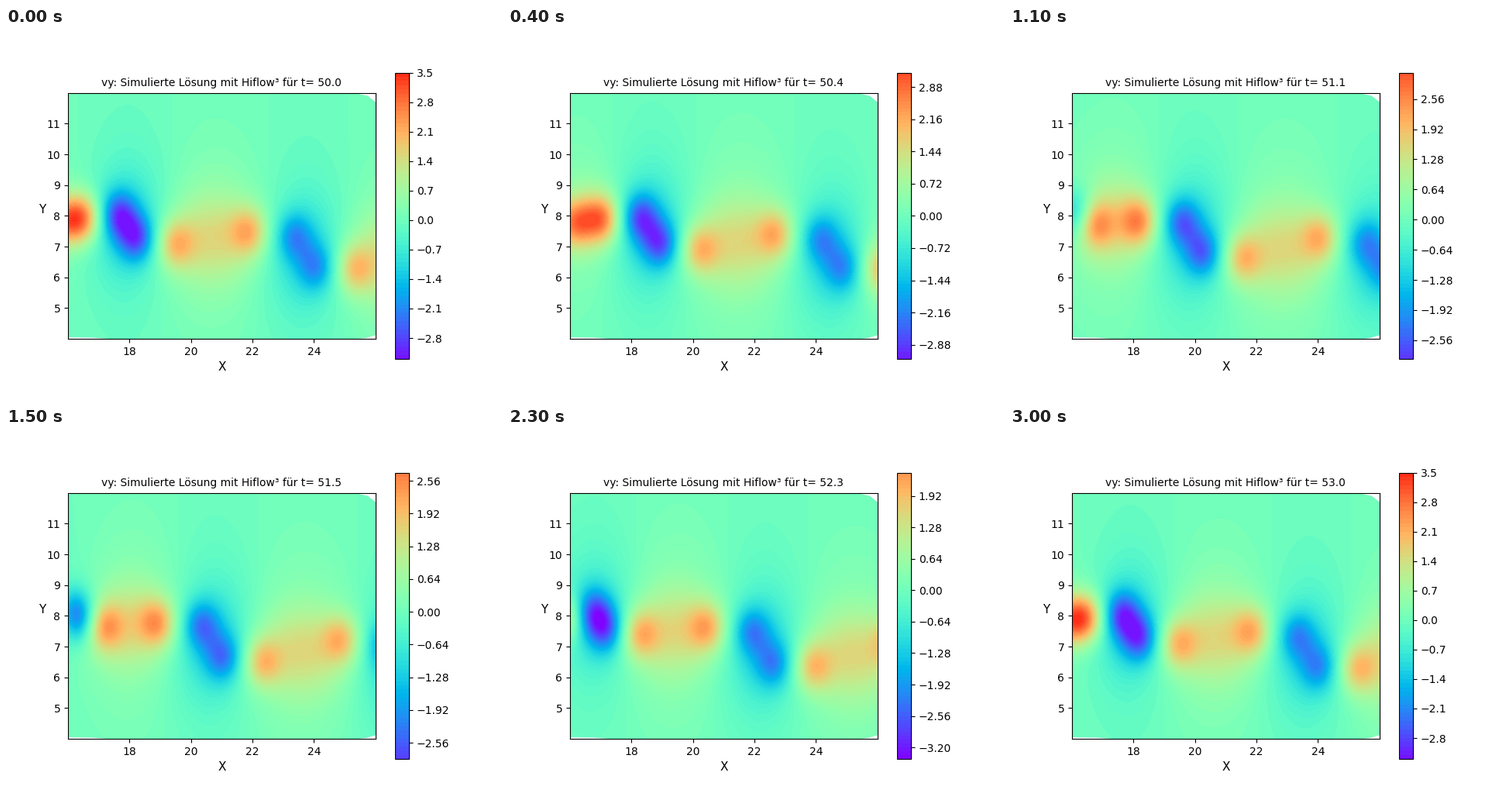
Animation of 640 by 480 pixels, one loop 3100 ms. Source, as a matplotlib script:

```python
import numpy as np
import matplotlib.pyplot as plt
from matplotlib.animation import FuncAnimation

FRAMES = 31
PERIOD = 3.02  # shedding period of the vortex street
SPEED = 2.0    # drift of the fully developed vortices
VMIN, VMAX = -3.45, 3.9

CORNERS = [
    [(25.3, 12), (25.75, 11.9), (26, 11.7), (26, 12)],
    [(25.45, 4), (25.7, 4.03), (26, 4.12), (26, 4)],
    [(16, 4.05), (16.8, 4.04), (17.3, 4), (16, 4)],
    [(16, 11.94), (16.2, 12), (16, 12)],
]

X, Y = np.meshgrid(np.linspace(16, 26, 251), np.linspace(4, 12, 201))


def rise(t, middle, width):
    return 1 / (1 + np.exp((middle - t) / width))


def core_path(x0, leave, ease, y0, y1, turn, turn_width):
    """A core that rests at x0, speeds up, and sinks from y0 to y1."""
    def at(t):
        x = x0 + SPEED * ease * np.log1p(np.exp((t - leave) / ease))
        return x, y0 + (y1 - y0) * rise(t, turn, turn_width)
    return at


def bump(x, y, w, h):
    return np.exp(-0.5 * (((X - x) / w) ** 2 + ((Y - y) / h) ** 2))


def vortex(trail, lead, birth, strength, boost, peak, peak_width,
           halo, halo_w, halo_h, tail, tail_w):
    """Two cores, then a halo and a wide tail that grow in a little later."""
    def at(t):
        (x1, y1), (x2, y2) = trail(t), lead(t)
        mx, my, sep = (x1 + x2) / 2, (y1 + y2) / 2, abs(x2 - x1)
        power = strength + boost / (1 + ((t - peak) / peak_width) ** 2)
        cores = bump(x1, y1, 0.42, 0.55) + bump(x2, y2, 0.42, 0.55)
        wide = np.exp(-0.5 * ((X - mx) / (tail_w + 0.33 * sep)) ** 2)
        around = tail * wide / np.cosh((Y - my) / 1.4)
        around += halo * bump(mx, my, halo_w + 0.25 * sep, halo_h)
        return (power * rise(t, birth, 0.3) * cores
                + rise(t, birth + 0.9, 0.3) * around)
    return at


down = vortex(
    core_path(16, 52.37, 0.6, 8.4, 6.8, 55.0, 1.6),
    core_path(16, 52.0, 0.6, 8.0, 6.2, 53.4, 1.0),
    birth=50.9, strength=1.1, boost=0.85, peak=53, peak_width=1.5,
    halo=0.4, halo_w=0.55, halo_h=1.2, tail=1.1, tail_w=0.95)
up = vortex(
    core_path(15.5, 54.15, 0.9, 7.9, 6.2, 56.1, 0.9),
    core_path(15.5, 52.85, 0.6, 8.1, 6.9, 56.0, 1.6),
    birth=52.3, strength=1.4, boost=0.9, peak=53.2, peak_width=0.8,
    halo=0.75, halo_w=0.5, halo_h=0.9, tail=0.9, tail_w=0.8)


def velocity(t):
    ages = [t + k * PERIOD for k in range(4)]
    return sum(up(a) - down(a) for a in ages)


def contour_levels(t):
    lo = np.interp(t, [50, 51.1, 51.5, 52.3, 53],
                   [-3.3, -2.96, -2.88, -3.44, -3.3])
    hi = np.interp(t, [50, 50.4, 51.1, 51.6, 52.3, 53],
                   [3.5, 3.15, 3.05, 2.58, 2.34, 3.5])
    step = 0.08 if hi - lo < 6.48 else 0.1
    first = int(np.floor(lo / step + 1e-6))
    last = int(np.ceil(hi / step - 1e-6))
    index = np.arange(first, last + 1)
    stride = int(np.ceil(len(index) / 10))
    levels = np.round(index * step, 4)
    return levels, levels[index % stride == 0]


fig = plt.figure(figsize=(6.4, 4.8), dpi=100)


def draw(i):
    t = 50 + i / 10
    fig.clear()
    ax = fig.add_subplot()
    levels, ticks = contour_levels(t)
    v = np.clip(velocity(t), levels[0] + 1e-3, levels[-1] - 1e-3)
    filled = ax.contourf(X, Y, v, levels=levels, cmap="rainbow",
                         vmin=VMIN, vmax=VMAX)
    for corner in CORNERS:
        ax.add_patch(plt.Polygon(corner, fc="white", ec="none", zorder=2))
    ax.set(xlim=(16, 26), ylim=(4, 12), aspect="equal",
           xticks=range(18, 26, 2), yticks=range(5, 12))
    ax.set_xlabel("X", fontsize=11)
    ax.set_ylabel("Y", fontsize=11, rotation=0)
    ax.set_title(f"vy: Simulierte Lösung mit Hiflow³ für t= {t:.1f}",
                 fontsize=10)
    fig.colorbar(filled, ax=ax, ticks=ticks)
    return []


anim = FuncAnimation(fig, draw, frames=FRAMES, interval=100,
                     init_func=lambda: [], repeat=True, repeat_delay=0)
plt.show()
```
